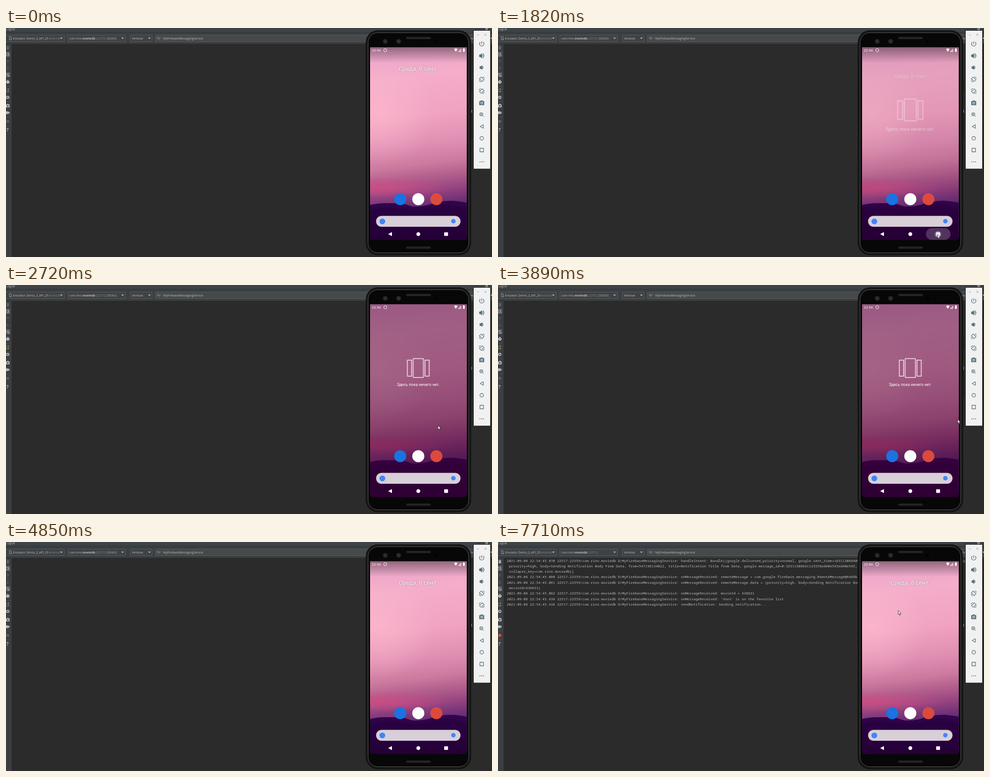
These frames come from a looping animation (1088 by 515 pixels, 8 s). An HTML page:

```html
<!DOCTYPE html>
<html lang="en">
<head>
<meta charset="utf-8">
<title>Logcat and emulator</title>
<style>
html, body { margin: 0; width: 100%; height: 100%; overflow: hidden; background: #2b2b2b; }
svg { display: block; width: 100%; height: 100%; }
text { white-space: pre; }
.ui { font: 6.6px "Open Sans", sans-serif; fill: #bbb; }
.muted { fill: #808384; }
.strong { font-weight: 700; }
.log { font: 7.83px "Noto Sans Mono", monospace; fill: #bbb; }
.phone { font-family: Roboto, sans-serif; fill: #fff; }
.line { fill: none; stroke-linecap: round; stroke-linejoin: round; }
.box { fill: #3f4244; stroke: #616365; stroke-width: .8; }

/* One percent of the loop is 80 ms. */
.cursor, .date, .recents, .dim, .scrim, .ripple, .touch, .at { animation: 8s linear infinite; }
.at { animation-timing-function: step-end; }
.cursor { animation-name: cursor; }
.date { animation-name: date; transform-origin: 923px 91px; }
.recents { animation-name: recents; transform-origin: 923px 203px; }
.dim { animation-name: dim; }
.scrim { animation-name: scrim; }
.ripple { animation-name: ripple; }
.touch { animation-name: touch; }
.dead { animation-name: dead; }
.alive { animation-name: alive; }
.running { animation-name: running; }
.log1 { animation-name: log1; }
.log2 { animation-name: log2; }
.log3 { animation-name: log3; }

@keyframes cursor {
  0% { opacity: 0; transform: translate(699px, 95px); animation-timing-function: step-end; }
  3.25% { opacity: 1; transform: translate(699px, 95px); animation-timing-function: steps(4); }
  6.66% { transform: translate(855px, 290px); animation-timing-function: steps(7); }
  12.625%, 13.25% { transform: translate(987px, 445px); animation-timing-function: steps(6); }
  19.375%, 24.5% { transform: translate(984px, 464px); animation-timing-function: steps(7); }
  30.625% { transform: translate(1014px, 302px); animation-timing-function: steps(1); }
  31.5% { transform: translate(1002px, 311px); animation-timing-function: steps(3); }
  34% { transform: translate(967px, 316px); animation-timing-function: steps(3); }
  36.6% { transform: translate(869px, 225px); animation-timing-function: steps(2); }
  38.4% { transform: translate(892px, 146px); animation-timing-function: steps(3); }
  41%, 41.75% { transform: translate(883px, 262px); animation-timing-function: steps(4); }
  45.25% { transform: translate(1023px, 308px); animation-timing-function: step-end; }
  48.625% { transform: translate(1029px, 302px); animation-timing-function: steps(6); }
  53.75% { opacity: 1; transform: translate(939px, 263px); animation-timing-function: step-end; }
  58.75% { opacity: 0; transform: translate(1065px, 110px); animation-timing-function: step-end; }
  81.375% { opacity: 1; transform: translate(1065px, 110px); animation-timing-function: steps(5); }
  85.375%, 100% { opacity: 1; transform: translate(896px, 154px); }
}
@keyframes date {
  0%, 21.125% { opacity: 1; transform: none; animation-timing-function: steps(2); }
  22.75% { opacity: .55; transform: translateY(17px) scale(.81); animation-timing-function: steps(2); }
  24.5% { opacity: 0; transform: translateY(25px) scale(.72); animation-timing-function: step-end; }
  55.375% { opacity: 0; transform: translateY(-7px) scale(.9); animation-timing-function: step-end; }
  56.25% { opacity: .1; transform: translateY(-5px) scale(.92); animation-timing-function: steps(5); }
  60.625%, 100% { opacity: 1; transform: none; }
}
@keyframes recents {
  0%, 21.125% { opacity: 0; transform: scale(1.3); animation-timing-function: steps(2); }
  22.75% { opacity: .45; transform: scale(1.155); animation-timing-function: steps(4); }
  26.2% { opacity: 1; transform: none; }
  55.375% { opacity: 1; transform: none; animation-timing-function: step-end; }
  56.25% { opacity: .42; transform: none; animation-timing-function: steps(2); }
  57.875%, 100% { opacity: 0; transform: none; }
}
@keyframes dim {
  0%, 21.125% { opacity: 0; animation-timing-function: steps(2); }
  22.75% { opacity: .16; animation-timing-function: steps(5); }
  27%, 55.375% { opacity: 1; animation-timing-function: step-end; }
  56.25% { opacity: .8; animation-timing-function: steps(5); }
  60.625%, 100% { opacity: 0; }
}
@keyframes scrim {
  0%, 22.75% { opacity: 1; animation-timing-function: steps(5); }
  27%, 55.375% { opacity: 0; animation-timing-function: step-end; }
  56.25% { opacity: .15; animation-timing-function: steps(5); }
  60.625%, 100% { opacity: 1; }
}
@keyframes ripple {
  0%, 21.125% { opacity: 0; animation-timing-function: steps(2); }
  22.75%, 23.6% { opacity: 1; animation-timing-function: steps(4); }
  27%, 100% { opacity: 0; }
}
@keyframes touch {
  0%, 21.12% { opacity: 0; transform: translate(985px, 464px); animation-timing-function: step-end; }
  21.125%, 23.6% { opacity: 1; transform: translate(985px, 464px); animation-timing-function: step-end; }
  24.5% { opacity: 0; transform: translate(939px, 263px); animation-timing-function: step-end; }
  54.6% { opacity: 1; transform: translate(939px, 263px); animation-timing-function: step-end; }
  57.1%, 100% { opacity: 0; transform: translate(939px, 263px); }
}
@keyframes dead { 0% { opacity: 1; } 80.5%, 100% { opacity: 0; } }
@keyframes alive { 0% { opacity: 0; } 80.5%, 100% { opacity: 1; } }
@keyframes running { 0% { opacity: 0; } 83%, 100% { opacity: 1; } }
@keyframes log1 { 0% { opacity: 0; } 92%, 100% { opacity: 1; } }
@keyframes log2 { 0% { opacity: 0; } 92.875%, 100% { opacity: 1; } }
@keyframes log3 { 0% { opacity: 0; } 96.375%, 100% { opacity: 1; } }
</style>
</head>
<body>
<svg viewBox="0 0 1088 515">
<defs>
  <linearGradient id="sky" gradientUnits="userSpaceOnUse" x1="895" y1="43" x2="940" y2="408">
    <stop offset="0" stop-color="#eaa5c9"/><stop offset=".18" stop-color="#f4adca"/>
    <stop offset=".42" stop-color="#f1a3c1"/><stop offset=".6" stop-color="#e08fb3"/>
    <stop offset=".72" stop-color="#cd7a9f"/><stop offset=".8" stop-color="#b4608e"/>
    <stop offset=".88" stop-color="#994681"/><stop offset="1" stop-color="#5e2872"/>
  </linearGradient>
  <linearGradient id="hill" x1="0" y1="0" x2="0" y2="1">
    <stop offset="0" stop-color="#32064d"/><stop offset=".25" stop-color="#2c0246"/><stop offset="1" stop-color="#24002f"/>
  </linearGradient>
  <linearGradient id="shade" x1="0" y1="0" x2="0" y2="1">
    <stop offset="0" stop-color="#000" stop-opacity=".38"/><stop offset="1" stop-color="#000" stop-opacity="0"/>
  </linearGradient>
  <radialGradient id="glow"><stop offset="0" stop-color="#cf4c84" stop-opacity=".85"/><stop offset="1" stop-color="#cf4c84" stop-opacity="0"/></radialGradient>
  <radialGradient id="light"><stop offset="0" stop-color="#ffbdd0" stop-opacity=".6"/><stop offset="1" stop-color="#ffbdd0" stop-opacity="0"/></radialGradient>
  <clipPath id="screen"><path d="M815 43.500H1031.500V468Q1031.500 477 1022.500 477H824Q815 477 815 468Z"/></clipPath>
  <path id="down" d="M-3-1.500H3L0 2Z" fill="#b0b2b4"/>
  <g id="bin"><rect x="1" y="41" width="6.500" height="1.200"/><rect x="1.700" y="42.800" width="5" height="5.200"/><rect x="3" y="40" width="2.400" height="1"/></g>
  <g id="turn" class="line" stroke="#546e7a" stroke-width="1.200">
    <path d="M-1.500-5.200 5.200 .8 1.200 4.800-5.500-1.200ZM-5.500 2Q-5 5.500-1.500 5.500M2-5.500Q5.500-5.500 5.500-2.500"/>
  </g>
</defs>

<!-- Log window -->
<rect width="1088" height="515" fill="#2b2b2b"/>
<path d="M0 0H1088V35H12V515H0Z" fill="#3c3f41"/>
<rect width="1088" height="9" fill="#3d4347"/>
<path d="M0 9.500H1088M0 35.500H1088M12.500 36V515" stroke="#323435" fill="none"/>
<text class="ui" x="0" y="5">Logcat</text>
<g class="ui">
  <rect class="box" x="-4" y="16" width="134.500" height="14.500"/>
  <rect class="box" x="138.500" y="16" width="129" height="14.500"/>
  <rect class="box" x="278.500" y="16" width="48.500" height="14.500"/>
  <rect class="box" x="334.500" y="16" width="690" height="14.500" style="fill:#45494a"/>
  <rect class="box" x="1030" y="16" width="70" height="14.500"/>
  <g class="line" stroke="#afb1b3" stroke-width=".8"><rect x="7.500" y="19.500" width="4" height="7" rx=".5"/><path d="M12 24V27"/></g>
  <text x="15.500" y="25.500">Emulator Zemlo_3_API_29 <tspan class="muted">Android</tspan></text>
  <text x="142" y="25.500">com.rino.<tspan class="strong">moviedb</tspan></text>
  <g class="muted">
    <text class="at dead" x="201" y="25.500">(22372) <tspan class="strong">[DEAD]</tspan></text>
    <text class="at alive" x="201" y="25.500">(22517)</text>
  </g>
  <text x="282" y="25.500">Verbose</text>
  <g class="line" stroke="#9da0a2" stroke-width=".8"><circle cx="340.500" cy="22.500" r="2.200"/><path d="M342 24 344 26M344 22.500H347"/></g>
  <text x="352" y="25.500">MyFirebaseMessagingService</text>
  <text x="1039" y="25.500">ns</text>
  <use href="#down" x="124" y="23"/><use href="#down" x="261" y="23"/><use href="#down" x="321" y="23"/><use href="#down" x="1087" y="23"/>
</g>
<circle cx="1076" cy="2" r="2" fill="none" stroke="#afb1b3" stroke-width="1.500"/>

<!-- Left toolbar -->
<path d="M0 53H9.500V65H0ZM0 99H9.500V111H0Z" fill="#515456"/>
<path d="M0 131.500H10M0 165.500H10M0 200.500H10M0 219.500H10" stroke="#515456" stroke-width=".7"/>
<use href="#bin" fill="#636668"/>
<use href="#bin" class="at log1" fill="#afb1b3"/>
<g class="line" stroke="#b4b6b8">
  <path d="M0 56.500H3M0 59H2M0 62.500H8M5.500 55V60M3.500 58.500 5.500 60.500 7.500 58.500"/>
  <path d="M4 78V72M1.500 74.500 4 72 6.500 74.500M4 87V93M1.500 90.500 4 93 6.500 90.500" stroke="#626567"/>
  <path d="M0 102.500H7M0 105.500H6Q8 105.500 8 107T6 108.500H4M5 107 3.500 108.500 5 110"/>
  <path d="M6 137.500H3Q0 138 0 141T3 144H5M5 136 7 137.500 5 139" stroke="#59a869"/>
  <circle cx="4" cy="156" r="2.600" stroke-width="2"/>
</g>
<g fill="#b4b6b8">
  <path d="M2 117H6V119H2ZM0 119.500H8V123H6.500V125H1.500V123H0Z"/>
  <path d="M0 172H2L3 170.500H5.500L6.500 172H8V178.500H0Z"/><circle cx="4" cy="175" r="1.700" fill="#3c3f41"/>
  <path d="M0 187.500H5.500V189.500L8 188V193L5.500 191.500V193.500H0Z"/>
  <circle cx="5.500" cy="142.500" r="1.700" fill="#c75450"/>
</g>
<rect x="1" y="207" width="6" height="6" fill="#5b5e60"/>
<rect class="at running" x="1" y="207" width="6" height="6" fill="#c75450"/>
<text x="1" y="233" style="font:700 10px 'Open Sans',sans-serif" fill="#b4b6b8">?</text>

<g class="log" id="log"></g>

<!-- Phone body -->
<rect x="805.500" y="5.500" width="235.500" height="505" rx="27" fill="#050505"/>
<rect x="807.500" y="7.500" width="231.500" height="501" rx="25" fill="#0c0c0c" stroke="#303030"/>
<rect x="810.500" y="10.500" width="225.500" height="495" rx="22" fill="#070707" stroke="#686868"/>
<path d="M1042.500 184V190" stroke="#aaa"/><path d="M1042.500 192V253M1042.500 115V145" stroke="#1a1a1a"/>
<g fill="#242424"><rect x="896" y="20" width="55" height="5" rx="2.500"/><rect x="896" y="491.500" width="55" height="5" rx="2.500"/>
  <circle cx="849" cy="30" r="5.500"/><circle cx="879" cy="30" r="5.500"/><circle cx="961" cy="30" r="4" fill="#020202"/></g>
<path d="M846 27 852 33M847 32 850 29M876 27 882 33M877 32 881 28" stroke="#464646" fill="none"/>

<!-- Phone screen -->
<g clip-path="url(#screen)">
  <rect x="815" y="43" width="217" height="434" fill="url(#sky)"/>
  <ellipse cx="835" cy="190" rx="125" ry="120" fill="url(#light)"/>
  <ellipse cx="835" cy="359" rx="165" ry="24" fill="url(#glow)"/>
  <path d="M815 398Q832 394 848 394T884 394Q894 396 905 400T945 398Q965 391 985 389T1031 393V477H815Z" fill="url(#hill)"/>
  <path d="M815 410Q850 400 890 407T960 402 1031 409V477H815Z" fill="#27003d" opacity=".5"/>
  <rect class="scrim" x="815" y="43" width="217" height="35" fill="url(#shade)"/>
  <rect class="dim" x="815" y="43" width="217" height="434" fill="#3c0032" fill-opacity=".45"/>

  <g class="phone">
    <text class="date" x="923" y="95.500" text-anchor="middle" font-size="13.600" style="text-shadow:0 .5px 2px #0007">Среда, 8 сент.</text>
    <g class="recents">
      <g class="line" stroke="#fff" stroke-opacity=".7" stroke-width="2">
        <rect x="911.500" y="165.500" width="23" height="42.500" rx="1"/><rect x="898.500" y="169" width="9.500" height="36"/><rect x="938" y="169" width="9.500" height="36"/>
      </g>
      <text x="923" y="227" text-anchor="middle" font-size="8.900">Здесь пока ничего нет.</text>
    </g>
    <text x="819" y="53" font-size="8">22:54</text>
    <circle cx="849" cy="50" r="3.500" fill="none" stroke="#fff"/>
    <path d="M1003 47.500Q1007 44.500 1011 47.500L1007 53.500ZM1025.500 46V45.500H1024V46.500H1023V53.500H1027V46.500H1025.500Z"/>
    <path d="M1012.500 53.200H1018.500V47Z" fill-opacity=".4" stroke="#fff" stroke-width=".8"/>
  </g>

  <circle cx="882.500" cy="385" r="13.500" fill="#1a73e0"/>
  <circle cx="923" cy="385" r="13.500" fill="#fff"/>
  <circle cx="963.500" cy="385" r="13.500" fill="#dc4a3d"/>
  <rect x="828.500" y="422.500" width="189" height="24.500" rx="12.250" fill="#d8cfd9"/>
  <circle cx="842.500" cy="435" r="6.500" fill="#4285f4"/>
  <circle cx="1001.500" cy="434.500" r="5" fill="#4285f4"/>

  <rect class="ripple" x="958" y="450" width="55" height="26.500" rx="13.250" fill="#fff" fill-opacity=".2"/>
  <path d="M864 459V468L855.500 463.500ZM981 459.500H989.500V467.500H981Z" fill="#fff"/>
  <circle cx="923" cy="463.500" r="4.300" fill="#fff"/>
</g>

<!-- Emulator controls -->
<rect x="1046.500" y="5.500" width="38" height="311.500" fill="#f1f1f1" stroke="#151515"/>
<path d="M1054.500 15.500H1058.500M1071 13 1075.500 17.500M1075.500 13 1071 17.500" stroke="#8a9296" stroke-width=".9"/>
<g class="line" stroke="#546e7a" stroke-width="1.300">
  <path d="M1065 30.500V36M1061.500 32A5 5 0 1 0 1068.500 32"/>
  <path d="M1067 60.500Q1068.500 62.500 1067 64.500M1067.500 57.500Q1073 62.500 1067.500 67.500M1067 86.500Q1069 89 1067 91.500"/>
  <path d="M1060 60.500H1062L1065 58V67L1062 64.500H1060ZM1061 87H1063L1065.500 85V93L1063 91H1061Z" fill="#546e7a"/>
  <circle cx="1064" cy="194" r="3.400"/><path d="M1066.500 196.500 1069.500 199.500M1062.500 194H1065.500M1064 192.500V195.500" stroke-width="1"/>
  <path d="M1068.500 217.500V225.500L1061.500 221.500ZM1061 270.500H1069V278.500H1061Z"/>
  <circle cx="1065" cy="248" r="4"/>
  <path d="M1061 301H1061.100M1065 301H1065.100M1069 301H1069.100" stroke-width="2.200"/>
</g>
<use href="#turn" x="1065" y="115.500"/>
<use href="#turn" transform="translate(1065 142) scale(-1 1)"/>
<path d="M1059.500 164.500H1062L1063 163H1067L1068 164.500H1070.500V173.500H1059.500Z" fill="#546e7a"/>
<circle cx="1065" cy="168.800" r="2.200" fill="#546e7a" stroke="#f1f1f1" stroke-width="1.100"/>

<circle class="touch" r="7" fill="#eee" fill-opacity=".38" stroke="#fff" stroke-opacity=".15"/>
<path class="cursor" d="M0 0V9L2 7.200 3.600 10.700 5 10.100 3.500 6.700H6.300Z" fill="#fff" stroke="#111" stroke-width=".8"/>
</svg>
<script>
const tag = ms => `2021-09-08 22:54:45.${ms} 22517-22559/com.rino.moviedb D/MyFirebaseMessagingService: `;
const received = ms => tag(ms) + "onMessageReceived: ";
const batches = [
  [tag("070") + "handleIntent: Bundle[{google.delivered_priority=normal, google.sent_time=1631130884096, google.ttl=2419200, google.original_priority=high",
    " priority=high, body=Sending Notification Body From Data, from=547196134022, title=Notification Title from Data, google.message_id=0:1631130884113355%ed40e545ed40e545,",
    " collapse_key=com.rino.moviedb}]"],
  [received("080") + "remoteMessage = com.google.firebase.messaging.RemoteMessage@6468b",
    received("081") + "remoteMessage.data = {priority=high, body=Sending Notification Body From Data,",
    " movieId=438631}",
    received("082") + "movieId = 438631"],
  [received("438") + "'Vorn' is on the favorite list.",
    tag("438") + "sendNotification: Sending notification..."]
];
const log = document.getElementById("log");
let row = 0;
batches.forEach((lines, i) => {
  for (const line of lines) {
    const text = document.createElementNS(log.namespaceURI, "text");
    text.setAttribute("class", `at log${i + 1}`);
    text.setAttribute("x", 19.7);
    text.setAttribute("y", 44.5 + 12.3 * row++);
    text.textContent = line;
    log.append(text);
  }
});
</script>
</body>
</html>
```
